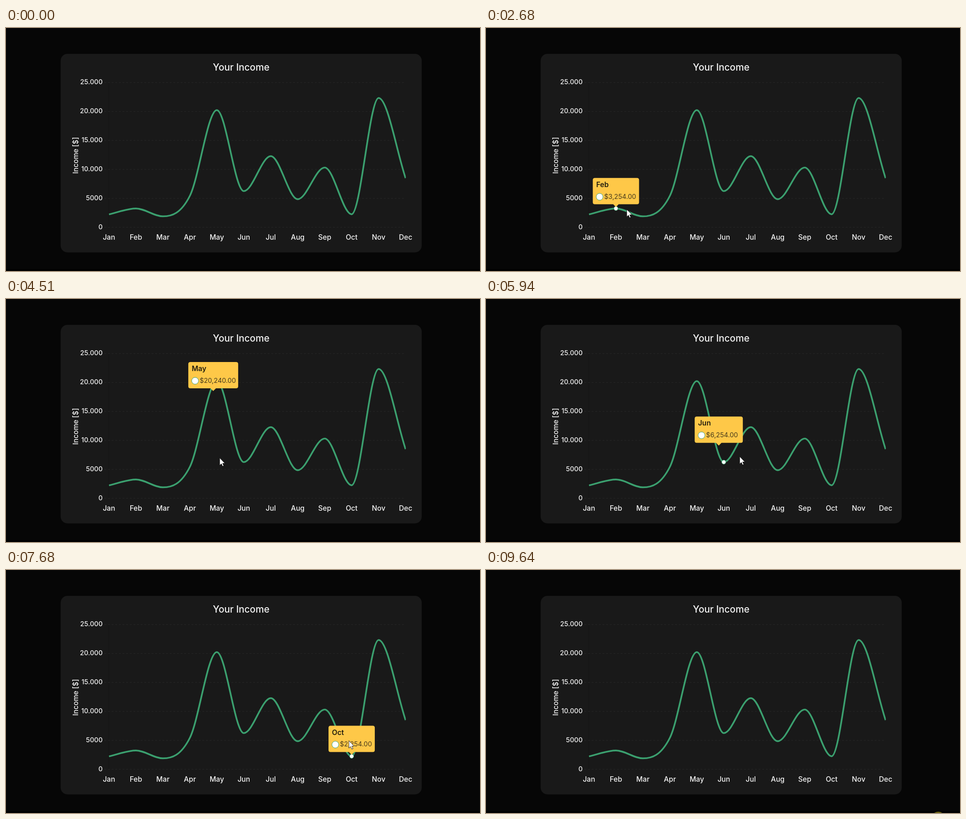
These frames come from a looping animation (1045x536 px, 9830 ms). An HTML page:

```html
<!DOCTYPE html>
<html lang="en">
<head>
<meta charset="utf-8">
<title>Your Income</title>
<style>
  html, body { margin: 0; width: 100%; height: 100%; overflow: hidden; background: #060606; }
  svg { display: block; width: 1045px; height: 536px; font-family: Inter, "Open Sans", sans-serif; }
  .label { fill: #f4f4f4; font-weight: 500; }
</style>
</head>
<body>
<svg id="stage" viewBox="0 0 1045 536">
  <defs><clipPath id="area"><rect x="226.5" y="110" width="655" height="335"/></clipPath></defs>
  <rect width="1045" height="536" fill="#060606"/>
  <rect y="532" width="1045" height="4" fill="#000"/>
  <rect x="120.5" y="57" width="796" height="438" rx="15" fill="#191919"/>
  <g id="axes"></g>
  <g clip-path="url(#area)">
    <path id="line" fill="none" stroke="#3ba06f" stroke-width="3.7"/>
    <circle id="dot" r="4.5" fill="#fff" stroke="#3ba06f"/>
  </g>
  <g id="tip">
    <path id="bubble" fill="#fec848"/>
    <circle cx="15" cy="41.5" r="7.5" fill="#fff" stroke="#3ba06f"/>
    <text id="tipTitle" x="7.5" y="20.3" font-size="15.6" font-weight="600" fill="#211c0e"></text>
    <text id="tipValue" x="25" y="45.8" font-size="14.5" fill="#463a1c"></text>
  </g>
  <circle id="click" cx="997" cy="548" r="15" fill="#6e6414"/>
  <path id="cursor" d="M0 0V16.5L3.8 13L6.3 18.6L9 17.5L6.5 12H11.6Z" fill="#fff" stroke="#111" stroke-width=".9"/>
</svg>
<script>
const LOOP = 9830;
const $ = id => document.getElementById(id);
const clamp01 = v => Math.max(0, Math.min(1, v));
const lerp = (a, b, k) => a + (b - a) * k;
const easeOutQuart = u => 1 - (1 - u) ** 4;

const months = "Jan Feb Mar Apr May Jun Jul Aug Sep Oct Nov Dec".split(" ");
const income = [2235, 3254, 1890, 5432, 20240, 6254, 12290, 4850, 10325, 2254, 22340, 8490];
const tipWidths = [102, 102, 99.5, 103, 111, 105, 107, 104, 108, 102, 110, 104];
const scaleY = v => 439.6 - v * 0.01277;
const xs = months.map((_, i) => 227 + i * 59.45);
const ys = income.map(scaleY);

// Monotone cubic tangents: flat at extrema, no overshoot.
function tangents(x, y) {
  const n = x.length;
  const d = x.slice(1).map((v, i) => (y[i + 1] - y[i]) / (v - x[i]));
  const m = x.map((_, i) =>
    i === 0 ? d[0] : i === n - 1 ? d[n - 2] : d[i - 1] * d[i] <= 0 ? 0 : (d[i - 1] + d[i]) / 2);
  d.forEach((slope, i) => {
    if (!slope) { m[i] = m[i + 1] = 0; return; }
    const a = m[i] / slope, b = m[i + 1] / slope, r = Math.hypot(a, b);
    if (r > 3) { m[i] = 3 * a / r * slope; m[i + 1] = 3 * b / r * slope; }
  });
  return m;
}

function curvePath(x, y) {
  const m = tangents(x, y), h = (x[1] - x[0]) / 3;
  let d = `M${x[0]} ${y[0]}`;
  for (let i = 1; i < x.length; i++) {
    d += `C${x[i - 1] + h} ${y[i - 1] + h * m[i - 1]} ${x[i] - h} ${y[i] - h * m[i]} ${x[i]} ${y[i]}`;
  }
  return d;
}

function track(x, y) {
  const m = tangents(x, y), last = x.length - 1;
  return t => {
    if (t >= x[last]) return y[last];
    const i = Math.max(0, x.findIndex(v => v > t) - 1);
    const h = x[i + 1] - x[i], u = clamp01((t - x[i]) / h), v = 1 - u;
    return y[i] * v * v * (1 + 2 * u) + m[i] * h * u * v * v
      + y[i + 1] * u * u * (3 - 2 * u) - m[i + 1] * h * u * u * v;
  };
}

const label = (text, x, y, size, anchor = "middle", extra = "") =>
  `<text class="label" x="${x}" y="${y}" font-size="${size}" text-anchor="${anchor}" ${extra}>${text}</text>`;

function drawAxes() {
  let out = label("Your Income", 518.5, 94, 20.8);
  out += label("Income [$]", 0, 0, 15.6, "middle", 'transform="translate(158.5 281) rotate(-90)"');
  out += '<path d="M226.5 120V440" stroke="#131313"/>';
  for (let v = 0; v <= 25000; v += 5000) {
    const y = scaleY(v);
    const text = v >= 10000 ? `${v / 1000}.000` : v;
    out += `<path d="M217 ${y}H881" stroke="#282828" stroke-dasharray="4 4"/>`;
    out += label(text, 213, y + 4.1, 14.5, "end");
  }
  months.forEach((name, i) => { out += label(name, xs[i], 466.5, 15.6); });
  $("axes").innerHTML = out;
}

// Time, x, y of the pointer.
const pointer = [
  [460, 966, 504], [950, 520, 478], [1300, 210, 446], [1460, 185, 441], [1850, 256.5, 401.5],
  [2470, 300, 400], [2900, 320, 400], [3470, 351, 397], [3750, 351.5, 396.5], [3980, 375, 388],
  [4250, 435, 362], [4510, 471, 350.5], [4780, 477, 348], [5330, 477, 348], [5470, 488, 347.5],
  [5640, 489, 347.5], [5940, 559, 347.5], [6340, 673, 354], [6640, 737, 364], [7410, 755.5, 376],
  [7680, 756, 376.5], [8050, 880, 457], [8440, 1008, 540]
];
const column = k => pointer.map(p => p[k]);
const pointerX = track(column(0), column(1));
const pointerY = track(column(0), column(2));

// Time and month index of each hover.
const hovers = [
  [1705, 0], [1915, 1], [2950, 2], [4080, 3], [4352, 4], [5804, 5],
  [6020, 6], [6230, 7], [6450, 8], [6690, 9], [7940, 10], [8050, 11]
];
const HIDE = 8150;

function tipState(t) {
  const s = { x: 302, y: 412, w: 102, index: 0 };
  hovers.forEach(([start, index], k) => {
    if (t < start) return;
    const end = Math.min(t, k + 1 < hovers.length ? hovers[k + 1][0] : LOOP);
    const p = easeOutQuart(clamp01((end - start) / 400));
    s.x = lerp(s.x, xs[index], p);
    s.y = lerp(s.y, ys[index], p);
    s.w = lerp(s.w, tipWidths[index], p);
    s.index = index;
  });
  s.opacity = clamp01((t - hovers[0][0]) / 200) * (1 - clamp01((t - HIDE) / 200));
  return s;
}

function bubblePath(w, h = 58, r = 4.5, c = 6) {
  return `M${r} 0H${w - r}Q${w} 0 ${w} ${r}V${h - r}Q${w} ${h} ${w - r} ${h}` +
    `H${w / 2 + c}l${-c} ${c}l${-c} ${-c}H${r}Q0 ${h} 0 ${h - r}V${r}Q0 0 ${r} 0Z`;
}

const show = (el, on) => el.setAttribute("visibility", on ? "visible" : "hidden");
const move = (el, x, y) => el.setAttribute("transform", `translate(${x} ${y})`);

function render(t) {
  const s = tipState(t);
  const i = s.index;
  $("tip").setAttribute("opacity", s.opacity);
  move($("tip"), s.x - s.w / 2, s.y - 67.2);
  $("bubble").setAttribute("d", bubblePath(s.w));
  $("tipTitle").textContent = months[i];
  $("tipValue").textContent = `$${income[i].toLocaleString("en-US")}.00`;

  show($("dot"), t >= hovers[0][0] && t < HIDE);
  move($("dot"), xs[i], ys[i]);

  show($("cursor"), t >= 460 && t < 8440);
  move($("cursor"), pointerX(t), pointerY(t));
  show($("click"), t >= 9640);
}

drawAxes();
$("line").setAttribute("d", curvePath(xs, ys));

const began = performance.now();
function tick() {
  render((performance.now() - began) % LOOP);
  requestAnimationFrame(tick);
}
tick();
</script>
</body>
</html>
```
